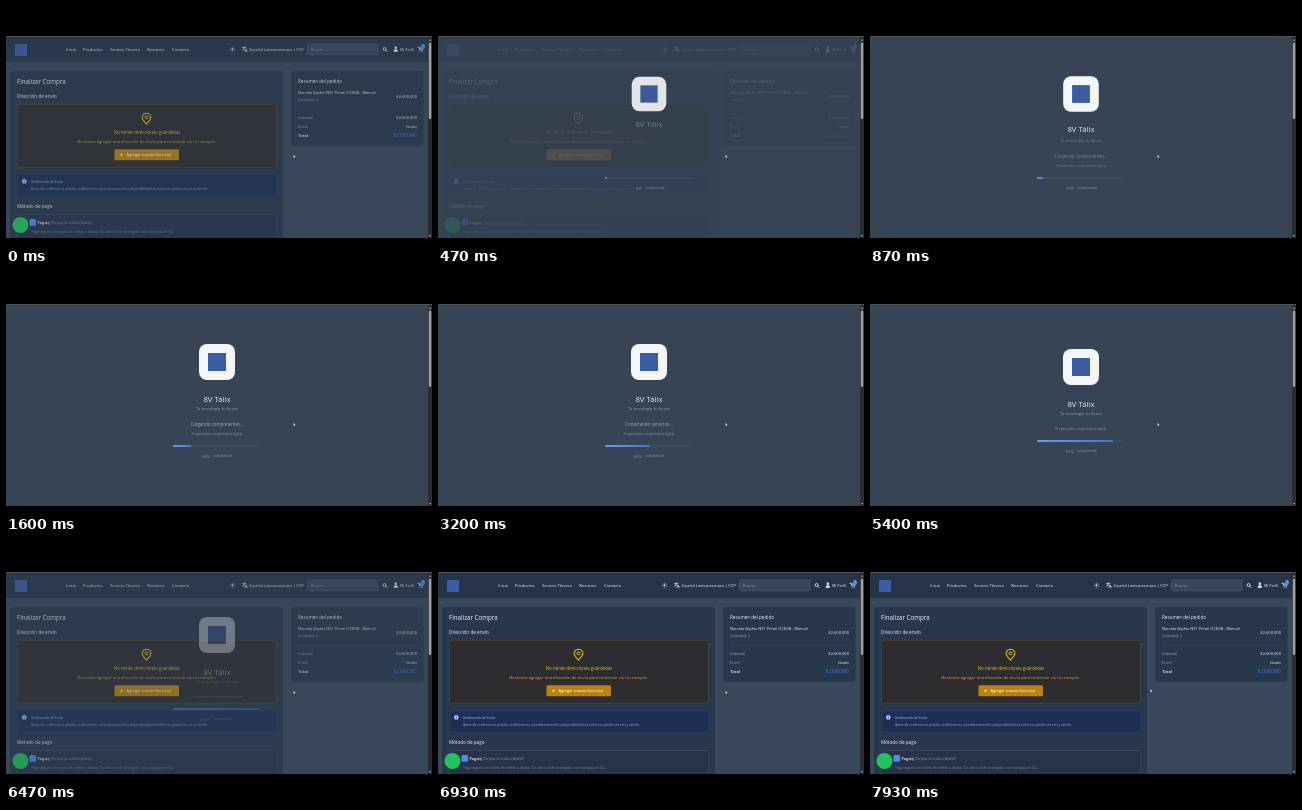
Animation, 426 px wide and 240 px high, one loop 8000 ms. Source, as an HTML page:

```html
<!DOCTYPE html>
<html lang="es">
<head>
<meta charset="utf-8">
<title>Finalizar Compra</title>
<style>
  html, body { margin: 0; width: 100%; height: 100%; overflow: hidden; background: #000; }
  svg { display: block; width: 100%; height: 100%; font-family: "Open Sans", "Noto Sans", sans-serif; }
  .mid { text-anchor: middle; }
  .end { text-anchor: end; }
  .bold { font-weight: 600; }
</style>
</head>
<body>
<svg id="stage" viewBox="0 0 426 240"></svg>
<script>
const LOOP = 8000;
const WHITE = '#eef2f7', MUTED = '#94a3b8', YELLOW = '#eebb12', BACK = '#364455';

const text = (x, y, size, fill, str, cls = '', id = '') =>
  `<text x="${x}" y="${y}" font-size="${size}" fill="${fill}" class="${cls}" id="${id}">${str}</text>`;
const box = (x, y, w, h, fill, r = 0, stroke = 'none') =>
  `<rect x="${x}" y="${y}" width="${w}" height="${h}" rx="${r}" fill="${fill}" stroke="${stroke}" stroke-width=".6"/>`;
const dot = (x, y, r, fill) => `<circle cx="${x}" cy="${y}" r="${r}" fill="${fill}"/>`;
const line = (d, color, w = .8) =>
  `<path d="${d}" fill="none" stroke="${color}" stroke-width="${w}" stroke-linecap="round" stroke-linejoin="round"/>`;

const menu = [[60, 'Inicio'], [77, 'Productos'], [104, 'Servicio Técnico'], [141, 'Nosotros'], [166, 'Contacto']];

const navBar = box(0, 31, 422, 25, '#263449') +
  box(9, 38, 12, 12, '#3d5ca3') +
  menu.map(([x, label]) => text(x, 45, 4.1, WHITE, label)).join('') +
  dot(226.5, 43.3, 1, '#cbd5e1') +
  line('M226.5 41v.1M226.5 45.6v.1M224.2 43.3h.1M228.7 43.3h.1M225 41.8h.1M228 41.8h.1M225 44.9h.1M228 44.9h.1', '#cbd5e1', .6) +
  line('M236.5 41.5h3.4M238.2 40.8v.7M239.2 41.5q-.7 2-2.7 2.7M237.2 42.5l1.6 1.6M238.8 45.8l1.3-3 1.3 3M239.3 44.8h1.6', '#dbe2ec', .6) +
  text(243.5, 45, 3.65, WHITE, 'Español Latinoamericano | COP') +
  box(301.5, 38, 70.5, 10.8, '#384659', 1.5, '#4b5b71') +
  text(305, 45, 3.9, '#8c99ab', 'Buscar...') +
  '<circle cx="378.6" cy="43" r="1.5" fill="none" stroke="#eef2f7" stroke-width=".8"/>' +
  line('M379.8 44.2l1.2 1.2', WHITE) +
  dot(389.8, 41.8, 1.2, WHITE) + '<path d="M387.6 45.7q0-2.4 2.2-2.4t2.2 2.4z" fill="#eef2f7"/>' +
  text(394, 45, 3.7, WHITE, 'Mi Perfil') +
  line('M412 41.3h1l.9 2.6h2.7l.7-1.9h-3.9', WHITE) + dot(414, 45.2, .5, WHITE) + dot(416.3, 45.2, .5, WHITE) +
  dot(417, 40.4, 2.3, '#3b82f6') + text(417, 41.4, 2.8, WHITE, '1', 'mid');

const address = text(11, 92, 4.65, WHITE, 'Dirección de envío') +
  box(11.3, 98.3, 259, 63, '#2d2d31', 2, '#6b4d1d') +
  line('M140.5 118q-4.3-4-4.3-6.7a4.3 4.1 0 0 1 8.6 0q0 2.700-4.3 6.700z', YELLOW, 1.1) +
  '<circle cx="140.5" cy="111.300" r="1.500" fill="none" stroke="#eebb12"/>' +
  text(141, 128, 4.4, YELLOW, 'No tienes direcciones guardadas', 'mid') +
  text(140.5, 137.2, 4.15, '#d9a91a', 'Necesitas agregar una dirección de envío para continuar con tu compra.', 'mid') +
  box(108.5, 143.3, 64.5, 11, '#bd830b', 1.5) +
  line('M114.300 148.800h2.400M115.500 147.600v2.400', WHITE, .7) +
  text(120.5, 150.3, 3.85, WHITE, 'Agregar nueva dirección', 'bold');

const stock = box(11.3, 168, 259.5, 22, '#1f2f53', 2, '#294170') +
  dot(18.300, 175.400, 2.300, '#9ccafc') + line('M18.300 175.300v1.200M18.300 174v.1', '#1f2f53', .6) +
  text(25, 177, 3.35, '#93c5fd', 'Verificación de Stock') +
  text(25, 184, 3.28, '#83ace9', 'Antes de confirmar tu pedido, verificaremos automáticamente la disponibilidad de todos los productos en tu carrito.');

const payment = text(11, 202.3, 4.65, WHITE, 'Método de pago') +
  box(11.3, 208.5, 259.5, 26, '#26344a', 2, '#40506a') +
  box(23.500, 213, 6.500, 6.800, '#4b8df0', 1) +
  text(31.5, 218.300, 3.8, WHITE, 'Pagviq', 'bold') +
  text(45, 218.300, 3.4, '#8592a7', '(Tarjeta de crédito/débito)') +
  text(25.5, 226.800, 3.3, '#7887a0', 'Pago seguro con tarjeta de crédito o débito. Tus datos están protegidos con encriptación SSL.') +
  dot(14.500, 219, 8, '#21c45a');

const summary = box(285, 65, 132.500, 75, '#29374c', 2.500) +
  text(292, 76.800, 4.600, WHITE, 'Resumen del pedido') +
  text(292, 88.200, 3.850, WHITE, 'Norvela Zephio N31 Prime (128GB - Blanco)') +
  text(292, 94.600, 3.800, MUTED, 'Cantidad: 2') +
  text(411, 91.500, 4.050, WHITE, '$2.600.000', 'end') +
  box(292, 102.800, 119, .5, '#445369') +
  text(292, 112.800, 3.900, MUTED, 'Subtotal') + text(411, 112.800, 4.050, WHITE, '$2.600.000', 'end') +
  text(292, 121.800, 3.900, MUTED, 'Envío') + text(411, 121.800, 4, WHITE, 'Gratis', 'end') +
  text(292, 131, 4.300, WHITE, 'Total', 'bold') + text(411, 131, 4.600, '#3b82f6', '$2.600.000', 'end');

const loader = `
  <g id="head">
    <g id="icon">${box(193, 70, 36, 36, '#f5f6f8', 8)}${box(202, 79, 18, 18, '#3d5ca3')}</g>
    ${text(211, 127.500, 7.800, '#e4e9f1', '8V Tálix', 'mid', 'brand')}
    ${text(211, 135.800, 3.850, MUTED, 'Tu tecnología, tu futuro', 'mid', 'slogan')}
  </g>
  ${text(211, 152.200, 4.450, '#a3afbf', '', 'mid', 'status')}
  <g id="foot">
    ${text(211, 160.500, 3.300, '#8c99ab', 'Preparando tu experiencia digital', 'mid', 'hint')}
    ${box(167, 171, 87, 2, '#3c4b5f', 1)}
    <rect id="bar" x="167" y="171" height="2" rx="1" fill="url(#blue)"/>
    ${text(204, 183.500, 4.300, '#8c99ab', '', 'end', 'percent')}
    ${text(207, 183.300, 3.550, '#8c99ab', 'completado')}
  </g>`;

const $ = id => document.getElementById(id);
$('stage').innerHTML = `
  <defs>
    <linearGradient id="blue"><stop stop-color="#6d9bea"/><stop offset="1" stop-color="#3f78d0"/></linearGradient>
    <clipPath id="view">${box(0, 30, 426, 202, '#000')}</clipPath>
  </defs>
  ${box(0, 0, 426, 240, '#000')}
  <g clip-path="url(#view)">
    ${box(0, 30, 426, 202, '#384759')}
    ${navBar}
    ${box(4, 65, 273, 180, '#29374c', 2.500)}
    ${text(11, 78, 6.200, WHITE, 'Finalizar Compra')}
    ${address}${stock}${payment}${summary}
    <g id="veil">${box(0, 31, 422, 201, BACK)}</g>
    <g id="loader">${loader}</g>
    ${box(422, 31, 4, 201, '#2b2c2e')}
    ${box(422.800, 36.500, 2.400, 76.500, '#a0a1a3', 1.200)}
    <path d="M424 33l1.300 1.800h-2.600zM424 230.800l1.300-1.800h-2.600z" fill="#a0a1a3"/>
    ${box(0, 30, 426, .9, '#50555c')}
    <path id="cursor" d="M0 0v3.200l.8-.7.6 1.200.6-.3-.6-1.100h1z" fill="#fff" stroke="#111" stroke-width=".25"/>
  </g>`;

// Piecewise linear value through [time, value] pairs.
function track(t, ...keys) {
  if (t <= keys[0][0]) return keys[0][1];
  for (let i = 1; i < keys.length; i++) {
    const [t0, a] = keys[i - 1], [t1, b] = keys[i];
    if (t < t1) return a + (b - a) * (t - t0) / (t1 - t0);
  }
  return keys[keys.length - 1][1];
}
const fade = (id, value) => $(id).setAttribute('opacity', value);
const move = (id, x, y) => $(id).setAttribute('transform', `translate(${x} ${y})`);

function draw(t) {
  const leaving = track(t, [6150, 1], [6470, .33], [6900, 0]);
  fade('veil', t < 5000 ? track(t, [70, .25], [470, .82], [870, 1]) : leaving);
  fade('loader', t < 5000 ? track(t, [200, 0], [470, .9], [600, 1]) : leaving);

  // Once the status line is removed, the centred column closes up.
  const shift = t < 5330 ? 0 : 5;
  move('head', 0, shift);
  move('foot', 0, -shift);

  const scale = track(t, [200, .9], [470, .96], [1000, 1]);
  $('icon').setAttribute('transform', `translate(211 88) scale(${scale}) translate(-211 -88)`);
  move('brand', 0, track(t, [470, -6.500], [1000, 0]));
  fade('brand', track(t, [250, 0], [470, .4], [900, 1]));
  for (const id of ['slogan', 'status', 'hint']) fade(id, track(t, [500, 0], [1100, 1]));

  $('status').textContent = shift ? '' : t < 2550 ? 'Cargando componentes...' : 'Conectando servicios...';
  $('bar').setAttribute('width', track(t, [300, 0], [470, 2.500], [930, 7], [1600, 18.500], [3200, 45], [5200, 75.500], [5400, 76], [5900, 87]));
  $('percent').textContent = Math.round(track(t, [400, 0], [1600, 34], [3200, 60], [5400, 97], [5700, 100])) + '%';

  move('cursor', track(t, [7100, 287.300], [7900, 280.300]), track(t, [7100, 148.700], [7900, 147]));
}

function tick(now) {
  draw(now % LOOP);
  requestAnimationFrame(tick);
}
draw(0);
requestAnimationFrame(tick);
</script>
</body>
</html>
```
